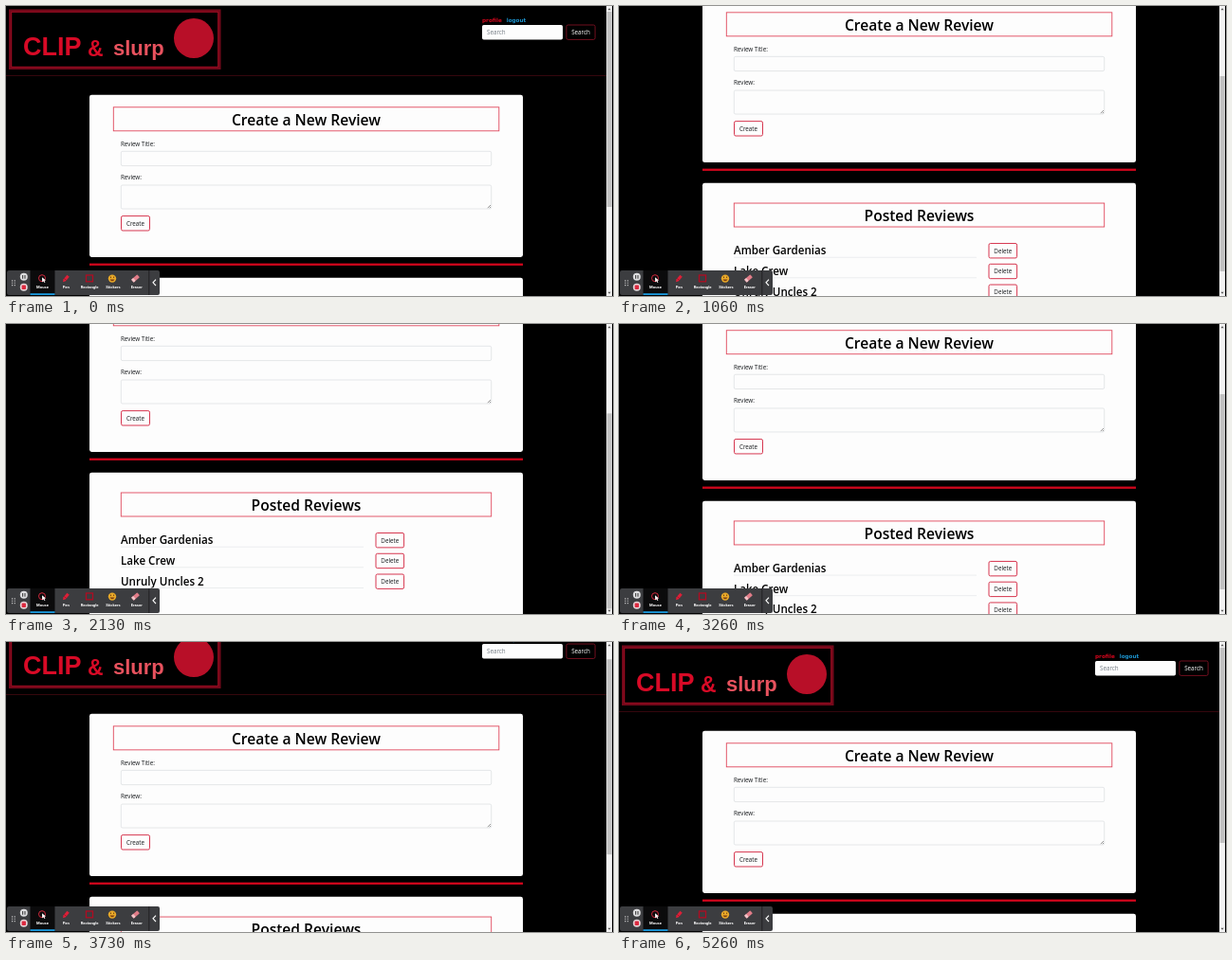
Write an HTML page that moves like this. It is 640 by 306 pixels and loops after 5330 ms.

```html
<!DOCTYPE html>
<html lang="en">
<head>
<meta charset="utf-8">
<title>Review page scroll</title>
<style>
  html, body { margin: 0; height: 100%; overflow: hidden; background: #000; }
  svg { display: block; width: 100vw; height: 100vh; }
  text { font: 6.25px "Open Sans", "Noto Sans", sans-serif; fill: #16191c; }
  .mid { text-anchor: middle; }
  .title { font-size: 15.6px; font-weight: 600; fill: #000; }
  .entry { font-size: 11.6px; font-weight: 600; fill: #000; }
  .nav { font: bold 5.7px "DejaVu Sans", sans-serif; }
  .brand { font: bold 27px "Liberation Sans", sans-serif; fill: #d80a26; }
  .tool { font: bold 4.2px Roboto, sans-serif; fill: #fff; text-anchor: middle; }
  .card { fill: #fdfdfd; }
  .frame { fill: none; stroke: #e0485c; stroke-width: .9; }
  .field { fill: #fdfdfd; stroke: #d3d7db; stroke-width: .6; }
  .button { fill: #fdfdfd; stroke: #d42c46; stroke-width: .95; }
</style>
</head>
<body>
<svg viewBox="0 0 640 306" preserveAspectRatio="none">
  <rect width="640" height="306"/>
  <g id="page">
    <rect x="4.5" y="5" width="220.5" height="60.5" fill="none" stroke="#74081a" stroke-width="3"/>
    <rect x="5.8" y="6.3" width="217.9" height="57.9" fill="none" stroke="#a80d24" stroke-width=".8"/>
    <text class="brand" x="18" y="52">CLIP</text>
    <text class="brand" x="86" y="53" style="font-size:23px">&amp;</text>
    <text class="brand" x="113" y="52" style="font-size:22px;fill:#e8525e">slurp</text>
    <circle cx="198" cy="34" r="21" fill="#b80f28"/>

    <text class="nav" x="502" y="17" style="fill:#d0061c">profile</text>
    <text class="nav" x="527.7" y="17" style="fill:#1c92cc">logout</text>
    <rect class="card" x="502" y="20" width="85" height="15.5" rx="1.7"/>
    <text x="507" y="30.2" style="fill:#757d85">Search</text>
    <rect x="590.9" y="20" width="30.2" height="15.4" rx="1.7" fill="#000" stroke="#8f1428" stroke-width=".8"/>
    <text class="mid" x="606" y="30.2" style="fill:#fff">Search</text>
    <rect y="73" width="633" height=".8" fill="#430911"/>

    <rect class="card" x="88" y="93.7" width="457" height="171.3" rx="2.4"/>
    <rect class="frame" x="113.3" y="106.8" width="406.5" height="25"/>
    <text class="title mid" x="316.5" y="126">Create a New Review</text>
    <text x="121" y="148">Review Title:</text>
    <rect class="field" x="121.3" y="153.3" width="390.4" height="15.3" rx="1.6"/>
    <text x="121" y="183.3">Review:</text>
    <rect class="field" x="121.3" y="189" width="390.4" height="25" rx="1.6"/>
    <path d="M507.8 213.2l3.2-3.2M509.8 213.2l1.2-1.2" stroke="#555" stroke-width=".6"/>
    <rect class="button" x="121.5" y="221.6" width="30" height="15.4" rx="1.6"/>
    <text class="mid" x="136.5" y="231.6">Create</text>

    <rect x="88" y="271.6" width="457" height="2.3" fill="#d0061c"/>

    <rect class="card" x="88" y="286.7" width="457" height="160" rx="2.4"/>
    <rect class="frame" x="121.3" y="308" width="390.4" height="25"/>
    <text class="title mid" x="316.5" y="327">Posted Reviews</text>
    <g id="entries"></g>
  </g>

  <rect x="633" width="6" height="306" fill="#f1f1f1"/>
  <rect id="thumb" x="633.6" width="5" height="206" fill="#c1c1c1"/>
  <path d="M634.5 4.2l1.6-2 1.6 2zM634.5 301.8l1.6 2 1.6-2z" fill="#555"/>

  <g id="toolbar">
    <rect x="1" y="279" width="161" height="26" rx="2" fill="#3c3d40"/>
    <path d="M25.5 279h26v26h-26z" fill="#0b0b0c"/>
    <path d="M25.5 303.2h26v1.8h-26z" fill="#1a9be0"/>
    <path d="M150.8 279v26" stroke="#1e1e20" stroke-width=".9"/>
    <path d="M158 288.6l-3 3.2 3 3.2" fill="none" stroke="#fff" stroke-width="1.1"/>
    <path d="M6.6 289.3v6M9.2 289.3v6" stroke="#d0d0d0" stroke-width="1.1" stroke-dasharray="1.1 1.3"/>
    <circle cx="18.8" cy="285.8" r="4" fill="#dcdcde"/>
    <path d="M17.6 283.9v3.8M20 283.9v3.8" stroke="#444" stroke-width="1.1"/>
    <circle cx="18.8" cy="296.8" r="4" fill="#e6d4d8"/>
    <rect x="16.6" y="294.6" width="4.4" height="4.4" rx=".8" fill="#dc2a40"/>
    <circle cx="38" cy="287.2" r="3.5" fill="none" stroke="#d2283c" stroke-width="1"/>
    <path d="M38 286.2l.2 5.2 1.3-1.2 1 1.8.9-.5-1-1.7 1.6-.2z" fill="#fff"/>
    <path d="M60 291.2l.6-3 3.8-4.4 2.4 2-3.8 4.4z" fill="#dc2038"/>
    <path d="M61.2 287.4l2.6 2.2" stroke="#8c1022" stroke-width=".7"/>
    <rect x="84.5" y="284" width="7" height="6.8" fill="none" stroke="#b00c22" stroke-width="1.3"/>
    <circle cx="112" cy="287.6" r="4.2" fill="#e8a828"/>
    <path d="M109.5 288.4q2.5 3.8 5 0z" fill="#7a3b10"/>
    <path d="M110.5 285.6v1.3M113.6 285.6v1.3" stroke="#5a3210" stroke-width=".9"/>
    <g transform="rotate(-40 136.5 287.5)">
      <rect x="132.3" y="285.5" width="8.4" height="4" rx=".8" fill="#e07c88"/>
      <rect x="132.3" y="285.5" width="2.8" height="4" rx=".8" fill="#f0c4c8"/>
    </g>
  </g>
</svg>
<script>
  const byId = id => document.getElementById(id);
  const page = byId('page'), thumb = byId('thumb');

  byId('entries').innerHTML = ['Amber Gardenias', 'Lake Crew', 'Unruly Uncles 2'].map((name, i) => `
    <g transform="translate(0 ${i * 21.75})">
      <text class="entry" x="121" y="362">${name}</text>
      <rect x="121" y="364.8" width="256" height=".6" fill="#dfe2e5"/>
      <rect class="button" x="390" y="350.5" width="29.6" height="15.4" rx="1.6"/>
      <text class="mid" x="404.8" y="360.5">Delete</text>
    </g>`).join('');

  byId('toolbar').insertAdjacentHTML('beforeend',
    ['Mouse', 'Pen', 'Rectangle', 'Stickers', 'Eraser'].map((label, i) =>
      `<text class="tool" x="${38.5 + i * 24.8}" y="298.4">${label}</text>`).join(''));

  const LOOP = 5330, STEP = 200 / 3;
  // Scroll stops as [ms, px], joined by a smooth monotone curve.
  const stops = [[100, 0], [467, 41], [1067, 100], [1400, 130],
                 [3080, 130], [3267, 100], [3733, 18], [3930, 0]];

  const slope = i => stops[i] && stops[i + 1]
    ? (stops[i + 1][1] - stops[i][1]) / (stops[i + 1][0] - stops[i][0]) : 0;
  const tangent = i => slope(i - 1) * slope(i) > 0 ? (slope(i - 1) + slope(i)) / 2 : 0;

  function scrollAt(ms) {
    const next = stops.findIndex(stop => stop[0] > ms);
    if (next < 1) return 0;
    const i = next - 1, [t0, y0] = stops[i], [t1, y1] = stops[next];
    const span = t1 - t0, u = (ms - t0) / span, v = 1 - u;
    return v * v * (1 + 2 * u) * y0 + u * u * (1 + 2 * v) * y1
      + span * u * v * (v * tangent(i) - u * tangent(next));
  }

  function draw() {
    const ms = performance.now() % LOOP;
    const y = scrollAt(Math.floor((ms + 7) / STEP) * STEP);
    page.setAttribute('transform', `translate(0 ${-y})`);
    thumb.setAttribute('y', 6 + y * .68);
    requestAnimationFrame(draw);
  }
  draw();
</script>
</body>
</html>
```
